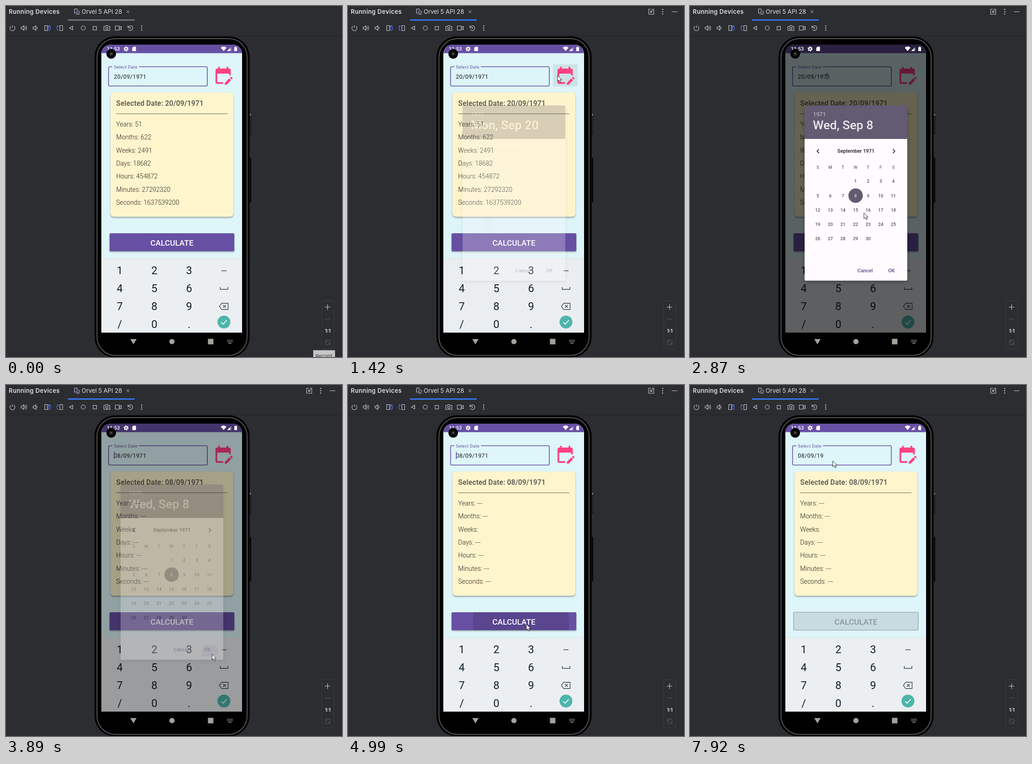
These frames come from a looping animation (733x763 px, 8000 ms). An HTML page:

```html
<!DOCTYPE html>
<html lang="en">
<head>
<meta charset="utf-8">
<title>Date calculator</title>
<style>
html, body { margin: 0; width: 100%; height: 100%; overflow: hidden; background: #2b2d30; }
svg { display: block; width: 100%; height: 100%; }
text { font-family: Roboto, sans-serif; white-space: pre; }
.ide { font: 13px Inter, sans-serif; fill: #dfe1e5; }
.line { fill: none; stroke: #ced0d6; stroke-width: 1.1; }
.mid { text-anchor: middle; }
.row { font-size: 14.06px; font-weight: 300; fill: #24241f; }
.key { font-size: 23.5px; fill: #10202a; }
.day { font-size: 9.4px; letter-spacing: .25px; fill: #1c1b1f; }
.act { font-size: 10.9px; font-weight: 500; fill: #5a4a8c; }
</style>
</head>
<body>
<svg viewBox="0 0 733 763" preserveAspectRatio="none">
  <defs>
    <filter id="soft" x="-20%" y="-20%" width="140%" height="140%"><feGaussianBlur stdDeviation="1.6"/></filter>
    <filter id="wide" x="-20%" y="-20%" width="140%" height="140%"><feGaussianBlur stdDeviation="5"/></filter>
    <clipPath id="btnClip"><rect x="226" y="494" width="272" height="39" rx="2.5"/></clipPath>
    <clipPath id="iconClip"><rect x="447" y="127" width="54" height="48"/></clipPath>
    <clipPath id="okClip"><rect x="417" y="565" width="46" height="25" rx="12"/></clipPath>
    <clipPath id="screen"><path d="M208 710V104a20 20 0 0 1 20-20h267a20 20 0 0 1 20 20v606z"/></clipPath>
  </defs>
  <rect width="733" height="763" fill="#2b2d30"/>

  <!-- window header -->
  <text class="ide" x="6" y="17" style="font-weight:600;letter-spacing:.4px">Running Devices</text>
  <g class="line">
    <path d="M153 6.5h-3.5v9h3M150 6.5h5.5v3"/>
    <rect x="154" y="11" width="6.5" height="4.5" rx="1" stroke="#b7a6e6"/><path d="M154 18h6.5M152 18h1"/>
    <path d="M263 9.5l6 6m0-6l-6 6" stroke="#868a91"/>
  </g>
  <text class="ide" x="165" y="17">Orvel 5 API 28</text>
  <rect id="tab" x="135" y="29" width="146" height="3" rx="1"/>
  <g id="tools">
    <path class="line" d="M661 7h-5v11h11V7h-4M665 9l-5 5m0-4v4h4M706.5 12.5h12"/>
    <g fill="#ced0d6"><circle cx="686.5" cy="7.5" r="1.2"/><circle cx="686.5" cy="12.5" r="1.2"/><circle cx="686.5" cy="17.5" r="1.2"/></g>
  </g>

  <!-- toolbar -->
  <g class="line">
    <path d="M14 42v5.5M10.5 44a5.5 5.5 0 1 0 7 0"/>
    <path d="M33 46h2.5l3.5-3v10l-3.5-3H33zM41 45.5a3.5 3.5 0 0 1 0 5M43 43a7 7 0 0 1 0 10"/>
    <path d="M59 46h2.5l3.5-3v10l-3.5-3H59zM67 45.5a3.5 3.5 0 0 1 0 5"/>
    <path d="M84.5 42.5h6v11h-6z"/><path d="M93 53.5c5 0 5-9 1-10.5m0 0h3m-3 0v3M92.5 42v11" stroke="#6c7cf0"/>
    <path d="M117.5 42.5h6v11h-6z"/><path d="M115 53.5c-5 0-5-9-1-10.5m0 0h-3m3 0v3" stroke="#6c7cf0"/>
    <path d="M138.5 48l7-4v8z"/><circle cx="168.5" cy="48" r="4.5"/><rect x="190" y="44.5" width="7.5" height="7.5"/>
    <path d="M213.5 44.5h3l1.5-2h4l1.5 2h3v8.5h-13z"/><circle cx="220" cy="48.5" r="2.5"/>
    <path d="M238.5 43.5h8.5v9h-8.5zM247 47l4.5-2.5v7L247 49"/>
    <path d="M266 43v4h4M266.5 46.5a5.2 5.2 0 1 1 .5 4.5M271 45.5v3l2 1"/>
  </g>
  <g fill="#ced0d6"><circle cx="296" cy="43.5" r="1.2"/><circle cx="296" cy="48" r="1.2"/><circle cx="296" cy="52.5" r="1.2"/></g>
  <path d="M0 64.5h733" stroke="#1e1f22"/>
  <path d="M732.5 65v698" stroke="#242528"/>

  <!-- zoom panel -->
  <rect x="689" y="640.5" width="26" height="105" rx="3" fill="none" stroke="#3d3f43"/>
  <path class="line" d="M695.5 654.5h12m-6-6v12"/>
  <path class="line" d="M695.5 680.5h12M697 726h10v10h-10zM699 731v-3h3M705 731v3h-3" style="stroke:#55585d"/>
  <text class="ide mid" x="702" y="710" style="font-size:10px;font-weight:700">1:1</text>
  <g id="tip">
    <rect x="670.5" y="748.5" width="47" height="20" fill="#c6c6c6" stroke="#a2a2a2"/>
    <text x="675" y="765" style="font:11px Inter,sans-serif" fill="#3c3c3c">Record</text>
  </g>

  <!-- phone body -->
  <path d="M533.5 236v43M533.5 330v97" stroke="#070707" stroke-width="3"/>
  <path d="M533.5 236v42" stroke="#4a4a4a"/><path d="M533.5 235v3" stroke="#ddd" stroke-width="1.5"/>
  <rect x="193" y="66" width="338.5" height="698" rx="45"/>
  <rect x="198.5" y="71" width="327.5" height="688.5" rx="40" fill="none" stroke="#565656" stroke-width="2"/>

  <!-- app -->
  <g clip-path="url(#screen)">
    <rect x="208" y="84" width="307" height="626" fill="#def5f9"/>
    <rect x="208" y="84" width="307" height="18.5" fill="#6750a4"/>
    <rect x="223.7" y="132" width="215.5" height="42" rx="3" fill="none" stroke="#6750a4" stroke-width="1.6"/>
    <path d="M232 132h58" stroke="#def5f9" stroke-width="3"/>
    <text x="235.5" y="136" font-size="9.4" letter-spacing=".35" fill="#6750a4">Select Date</text>
    <text id="field" x="235.3" y="158" font-size="12.5" letter-spacing=".45" fill="#1c1b1f"></text>
    <rect id="caret" y="145" width="1.5" height="16" fill="#6750a4"/>
    <path id="handle" d="M304.5 161l4.8 6.5a6.3 6.3 0 1 1-9.6 0z" fill="#6750a4"/>
    <circle id="iconRip" clip-path="url(#iconClip)" cx="459" cy="153"/>
    <path transform="translate(451.5 128.5) scale(1.85)" fill="#ff4081" d="M12 22H5a2 2 0 0 1-2-2L3.01 6c0-1.1.88-2 1.99-2h1V2h2v2h8V2h2v2h1c1.1 0 2 .9 2 2v6h-2v-2H5v10h7v2zm10.13-5.01.71-.71a1 1 0 0 0 0-1.41l-.71-.71a1 1 0 0 0-1.41 0l-.71.71 2.12 2.12zm-.71.71-5.3 5.3H14v-2.12l5.3-5.3 2.12 2.12z"/>

    <rect x="228" y="189.5" width="268" height="271" rx="7" opacity=".3" filter="url(#soft)"/>
    <rect x="228" y="188" width="268" height="270" rx="7" fill="#fff5cd"/>
    <text id="chosen" x="240.3" y="217" font-size="15.6" font-weight="700" letter-spacing=".08" fill="#6b675d"></text>
    <path d="M240 234.3h243" stroke="#858069" stroke-width="1.2"/>
    <g id="rows"></g>

    <rect id="btnShade" x="226" y="496" width="272" height="38.5" rx="2.5" opacity=".4" filter="url(#soft)"/>
    <rect id="btn" x="226" y="494" width="272" height="39" rx="2.5" stroke-width="1.6"/>
    <circle id="btnRip" clip-path="url(#btnClip)"/>
    <text id="btnText" class="mid" x="362" y="520.5" font-size="17.2" font-weight="500">CALCULATE</text>

    <rect x="208" y="549" width="307" height="161" fill="#eceff2"/>
    <path d="M208 549.3h307" stroke="#dfe5e8"/>
    <g id="keys"></g>
    <path d="M470 575.5h11M467.5 611v5h16.5v-5" fill="none" stroke="#37474f" stroke-width="1.5"/>
    <path d="M465.5 653l5-6.8h14v13.6h-14zM473.5 650l6 6m0-6l-6 6" fill="none" stroke="#37474f" stroke-width="1.4"/>
    <circle cx="475.5" cy="687" r="14" fill="#4db6ac"/>
    <path d="M469.5 687.5l4.2 4.2 8-8.5" fill="none" stroke="#fff" stroke-width="1.7"/>
    <rect id="dim" x="208" y="84" width="307" height="626"/>
  </g>

  <!-- status bar and navigation -->
  <g fill="#fff">
    <text x="220" y="97.3" font-size="11.2" font-weight="500">11:53</text>
    <circle cx="262" cy="93.3" r="2.9" fill="none" stroke="#fff" stroke-width="2.3"/>
    <circle cx="262" cy="93.3" r="4.7" fill="none" stroke="#fff" stroke-width="1.5" stroke-dasharray="2.46"/>
    <path d="M278 88.5h5.5v9.5h-8v-7zM468.5 90.5a9 9 0 0 1 12.5 0l-6.2 7.5zM498 89.5h1.8v-1.2h2.4v1.2h1.8V98h-6z"/>
    <path d="M482.5 98l9-9v9z" opacity=".45"/><path d="M482.5 98l6-6v6z"/>
  </g>
  <circle cx="229.5" cy="104" r="10.5"/>
  <circle cx="229.5" cy="104" r="4" fill="#1c1c1e" stroke="#333"/>
  <circle cx="229.5" cy="104" r="1.3" fill="#8a8a8a"/>
  <g fill="#a3a19a">
    <path d="M271 724h14l-7 11.5z"/><circle cx="362" cy="729.5" r="5.8"/><rect x="440.5" y="723.5" width="12" height="12"/>
  </g>
  <path d="M482.5 726.5h12M482.5 729.5h12" stroke="#c8c8c8" stroke-width="1.5" stroke-dasharray="1.5 1.1"/>
  <path d="M485 732.8h7" stroke="#c8c8c8" stroke-width="1.3"/>

  <!-- date picker -->
  <g id="dialog">
    <rect x="250" y="222" width="224" height="378" opacity=".25" filter="url(#wide)"/>
    <rect x="250" y="216" width="224" height="381" rx="2.5" fill="#fffbfe"/>
    <path d="M250 289v-70.500a2.500 2.500 0 0 1 2.500-2.500h219a2.500 2.500 0 0 1 2.500 2.500v70.500z" fill="#625b71"/>
    <text x="268.5" y="240.3" font-size="12.5" fill="#cbc6d1">1971</text>
    <text id="head" x="268" y="268" font-size="26.6" font-weight="500" fill="#ebe6ee"></text>
    <g id="month">
      <path d="M281.5 311.3l-4.3 4.3 4.3 4.3M442.5 311.3l4.3 4.3-4.3 4.3" fill="none" stroke="#1c1b1f" stroke-width="1.6"/>
      <text class="mid" x="362" y="319.3" font-size="10.9" font-weight="500" fill="#1c1b1f">September 1971</text>
      <circle id="pick" r="15.7" fill="#625b71"/>
    </g>
    <circle id="okRip" clip-path="url(#okClip)" cx="449" cy="585" fill="#6750a4" opacity=".2"/>
    <text class="act mid" x="382" y="579">Cancel</text>
    <text class="act mid" x="439.5" y="579">OK</text>
  </g>
  <path id="cursor" d="M0 0V12.8L3 10l2.2 5 2.2-1L5.3 9.3h4z" fill="#fff" stroke="#111" stroke-width=".9"/>
</svg>
<script>
const LOOP = 8000;
const $ = id => document.getElementById(id);
const set = (id, attrs) => { for (const k in attrs) $(id).setAttribute(k, attrs[k]); };
const show = (id, on) => set(id, { visibility: on ? "visible" : "hidden" });
const write = (e, s) => { if (e.textContent !== s) e.textContent = s; };
const ramp = (t, a, b) => Math.min(1, Math.max(0, (t - a) / (b - a)));
const smooth = u => u * u * (3 - 2 * u);
const mix = (a, b, u) => a + (b - a) * u;

function label(parent, cls, x, y, s) {
  const e = document.createElementNS("http://www.w3.org/2000/svg", "text");
  e.setAttribute("class", cls);
  e.setAttribute("x", x);
  e.setAttribute("y", y);
  e.textContent = s;
  $(parent).append(e);
  return e;
}

const units = ["Years", "Months", "Weeks", "Days", "Hours", "Minutes", "Seconds"];
const rows = units.map((_, i) => label("rows", "row", 240.3, 262 + i * 28.35, ""));

["123", "456", "789", "/0."].forEach((line, r) =>
  [...line].forEach((c, i) => label("keys", "key mid", 248 + i * 75.7, 583.3 + r * 39, c)));

const colX = c => 278.8 + c * 27.5;
const rowY = r => 381 + r * 31.2;
const cell = day => [(day + 2) % 7, Math.floor((day + 2) / 7)];
[..."SMTWTFS"].forEach((c, i) => label("month", "day mid", colX(i), 354.3, c).style.fill = "#49454f");
const days = Array.from({ length: 30 }, (_, i) => {
  const [c, r] = cell(i + 1);
  return label("month", "day mid", colX(c), rowY(r) + 3.4, i + 1);
});

// pointer stops: time, x, y
const stops = [
  [90, 705, 768], [670, 457, 151], [1800, 457, 151], [2400, 362, 418], [2740, 362, 418],
  [3150, 434, 549.5], [3290, 434, 549.5], [3410, 449.5, 585], [4050, 449.5, 585],
  [4520, 402, 492], [4560, 402, 492], [4650, 389, 520], [5250, 389, 520], [5590, 376.5, 489],
  [5650, 376.5, 489], [6120, 304.5, 151], [6320, 304.5, 151], [6450, 311.5, 165], [LOOP, 311.5, 165]
];
function pointer(t) {
  const i = stops.findIndex(s => s[0] > t);
  if (i < 1) return stops[0].slice(1);
  const [a, b] = [stops[i - 1], stops[i]], u = smooth(ramp(t, a[0], b[0]));
  return [mix(a[1], b[1], u), mix(a[2], b[2], u)];
}

// caret: from, to, x
const carets = [
  [170, 640, 298], [1500, 3750, 298], [3750, 5180, 235.5], [5680, 6320, 235.5],
  [6320, 6990, 305.3], [7320, 7460, 298], [7460, 7920, 290.5]
];

const first = [51, 622, 2491, 18682, 454872, 27292320, 1637539200];
const second = [51, 623, 2492, 18693, 455160, 27309600, 1638576000];
const blank = units.map(u => u === "Weeks" ? "" : "---");

function draw(t) {
  const changed = t >= 3750, off = t >= 7320;
  const date = changed ? "08/09/1971" : "20/09/1971";
  show("tip", t < 140);
  show("tools", t >= 140);
  set("tab", { fill: t < 900 ? "#6f737a" : "#3574f0" });

  write($("field"), t >= 7460 ? "08/09/19" : off ? "08/09/197" : date);
  write($("chosen"), "Selected Date: " + date);
  const values = !changed ? first : t < 5120 || off ? blank : second;
  rows.forEach((e, i) => write(e, `${units[i]}: ${values[i]}`));

  const caret = carets.find(k => t >= k[0] && t < k[1]);
  show("caret", caret);
  if (caret) set("caret", { x: caret[2] });
  show("handle", t >= 6320 && t < 6590);

  // touch ripples
  set("iconRip", { r: mix(0, 52, ramp(t, 920, 1200)), opacity: 0.07 * (1 - ramp(t, 1450, 1650)) });
  const u = ramp(t, 4800, 5190);
  set("btnRip", {
    cx: mix(389, 365, u), cy: mix(520, 514, u), r: mix(20, 194, u),
    opacity: t < 4800 ? 0 : 0.13 * (1 - ramp(t, 5150, 5450))
  });
  set("okRip", { r: t < 3610 ? 0 : mix(12, 26, ramp(t, 3610, 3950)) });

  set("btn", { fill: off ? "#c8dbe0" : "#6750a4", stroke: off ? "#a0b0b4" : "none" });
  set("btnText", { fill: off ? "#89979b" : "#fff" });
  show("btnShade", !off);

  // picker
  const opening = t < 2500;
  const alpha = opening ? ramp(t, 1360, 1610) : 1 - ramp(t, 3740, 3945);
  const dim = opening ? ramp(t, 1420, 1640) : 1 - ramp(t, 3750, 4086);
  set("dialog", { opacity: t < 1400 ? 0 : alpha });
  set("dim", { opacity: 0.6 * dim });
  set("month", { opacity: ramp(t, 1410, 1560) });
  const day = t < 2620 ? 20 : 8, [col, row] = cell(day);
  write($("head"), day === 20 ? "Mon, Sep 20" : "Wed, Sep 8");
  set("pick", { cx: colX(col), cy: rowY(row) });
  days.forEach((e, i) => e.style.fill = i + 1 === day ? "#fff" : "#1c1b1f");

  const [x, y] = pointer(t);
  set("cursor", { transform: `translate(${x} ${y})` });
}

function tick() {
  draw(performance.now() % LOOP);
  requestAnimationFrame(tick);
}
tick();
</script>
</body>
</html>
```
